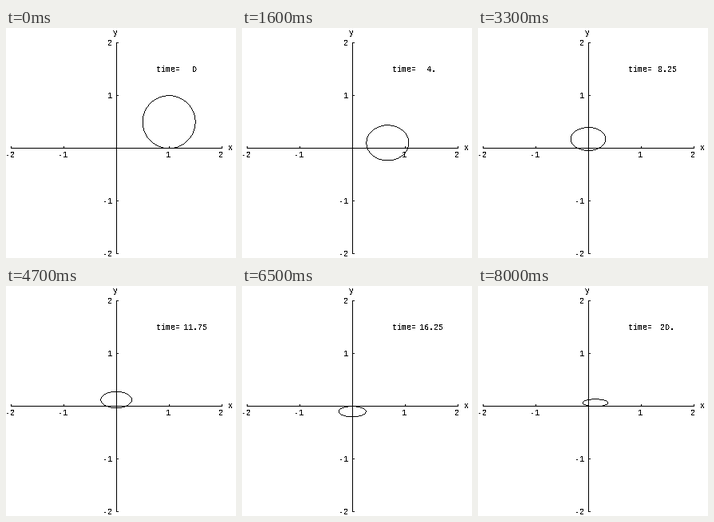
Recreate the animation shown at these times as a matplotlib script. Size 288 by 288 pixels, loop 8100 ms.

```python
import numpy as np
import matplotlib.pyplot as plt
from matplotlib.animation import FuncAnimation

SIZE = 288
UNIT = 66                        # pixels per axis unit
ORIGIN_X, ORIGIN_Y = 138.1, 150.7
FRAMES, INTERVAL, STEP = 81, 100, 0.25
CHAR = 6                         # character advance in pixels

fig = plt.figure(figsize=(SIZE / 72, SIZE / 72), dpi=72, facecolor="white")
ax = fig.add_axes([0, 0, 1, 1])


def plain_digits(text):
    # the font's zero carries a dot; its capital O is the plain form
    return text.replace("0", "O")


def label(center, baseline, text):
    return ax.text(center - CHAR * len(text) / 2, baseline, plain_digits(text),
                   color="black", family="Liberation Mono", size=10,
                   ha="left", va="baseline", antialiased=False)


def draw_axes(canvas):
    col, row, reach = int(ORIGIN_X), int(ORIGIN_Y), 2 * UNIT
    canvas[row, col - reach:col + reach + 1] = 0
    canvas[row - reach:row + reach + 1, col] = 0
    for n in (-2, -1, 1, 2):
        x, y = col + n * UNIT, row - n * UNIT
        canvas[row - 2:row, x] = 0
        canvas[y, col + 1:col + 3] = 0
        text = str(n)
        label(x - 1, 162, text)
        label(133 - CHAR * len(text) / 2, y + 4, text)
    label(281, 153, "x")
    label(137, 9, "y")


def shallow_arc(center, a, b):
    """Pixels along the a-axis where the ellipse is flat, with offsets along b."""
    limit = a * a / np.hypot(a, b) + 0.5
    pixels = np.arange(np.ceil(center - limit - 0.5), center + limit - 0.5)
    u = (pixels + 0.5 - center) / a
    return pixels.astype(int), b * np.sqrt(np.maximum(0, 1 - u * u))


def draw_ellipse(canvas, cx, cy, rx, ry):
    cols, dy = shallow_arc(cx, rx, ry)
    rows, dx = shallow_arc(cy, ry, rx)
    for sign in (-1, 1):
        canvas[np.floor(cy + sign * dy).astype(int), cols] = 0
        canvas[rows, np.floor(cx + sign * dx).astype(int)] = 0


def clock_text(t):
    return f"{t:g}." if t and t == int(t) else f"{t:g}"


background = np.ones((SIZE, SIZE))
draw_axes(background)
image = ax.imshow(background, cmap="gray", vmin=0, vmax=1, aspect="auto",
                  interpolation="nearest", extent=(0, SIZE, SIZE, 0))
ax.axis("off")
label(203, 55, "time=")
value = label(237, 55, "0")


def update(i):
    t = i * STEP
    decay = np.exp(-0.1 * t)
    # damped oscillation of the centre while the ellipse flattens
    x, y = decay * np.cos(2 * np.pi * t), 0.5 * decay * np.cos(2.4 * np.pi * t)
    canvas = background.copy()
    draw_ellipse(canvas, ORIGIN_X + UNIT * x, ORIGIN_Y - UNIT * y,
                 UNIT * (0.2 + 0.3 * decay), UNIT * 0.5 * decay)
    image.set_data(canvas)
    text = clock_text(t)
    value.set_text(plain_digits(text))
    value.set_x(237 - CHAR * len(text) / 2)
    return image, value


anim = FuncAnimation(fig, update, frames=FRAMES, interval=INTERVAL,
                     repeat=True, repeat_delay=0, blit=False)
plt.show()
```
